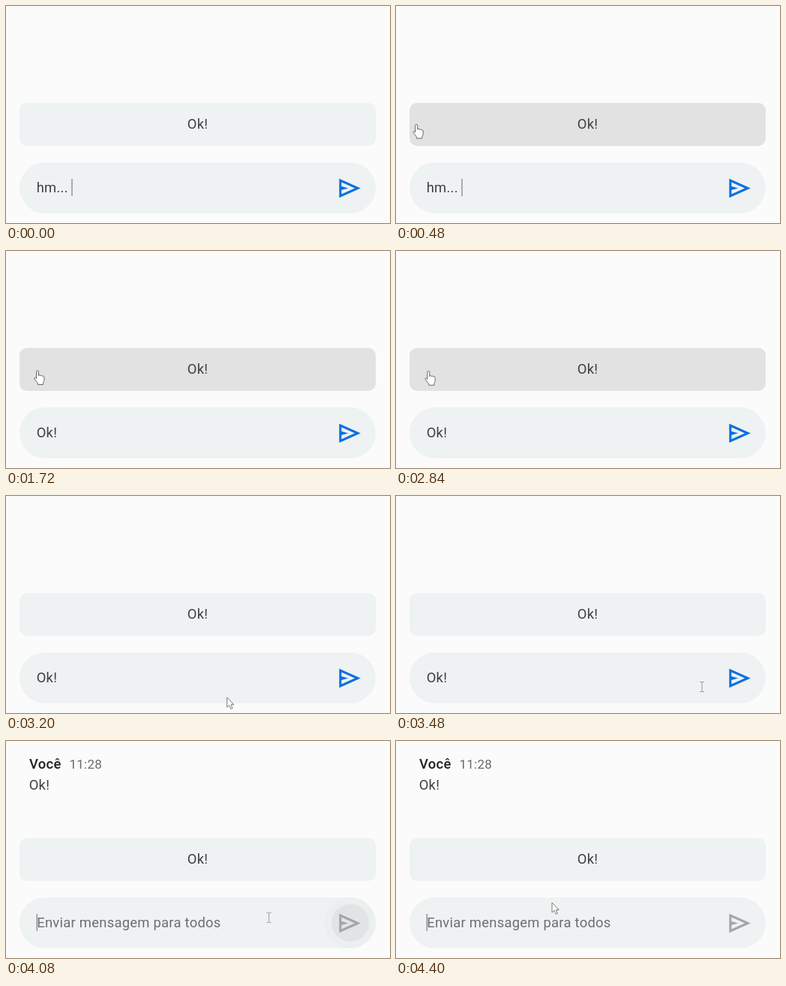
Write an HTML page that moves like this. It is 512 by 290 pixels and loops after 4.44 s.

```html
<!DOCTYPE html>
<html lang="pt">
<head>
<meta charset="utf-8">
<title>Chat</title>
<style>
  html, body { margin: 0; width: 100%; height: 100%; overflow: hidden; background: #fbfbfb; }
  svg { display: block; width: 512px; height: 290px; }
  text {
    font: 18.4px Roboto, sans-serif;
    letter-spacing: .0143em;
    fill: #3c4043;
    white-space: pre;
  }
  #hint { fill: #6b6e72; }
  .name { font-weight: 500; fill: #202124; }
  .time { font-size: 17px; fill: #66696d; }
  #pointer path { fill: #fff; stroke: #666; stroke-width: 1; stroke-linejoin: round; }
  #pointer #arrow { stroke: #777; }
  #pointer #beam { fill: none; stroke: #999; }
</style>
</head>
<body>
<svg viewBox="0 0 512 290">
  <rect width="512" height="290" fill="#fbfbfb"/>

  <g id="message">
    <text class="name" x="31" y="37">Você</text>
    <text class="time" x="84.5" y="37">11:28</text>
    <text x="30.7" y="65">Ok!</text>
  </g>

  <rect id="reply" x="18" y="129.5" width="475" height="57.5" rx="10"/>
  <text x="255.5" y="164" text-anchor="middle">Ok!</text>

  <rect x="18" y="209" width="475" height="68" rx="34" fill="#eef2f3"/>
  <text id="draft" x="40.7" y="249"></text>
  <text id="hint" x="41.2" y="249">Enviar mensagem para todos</text>
  <rect id="caret" y="231" width="1" height="23" fill="#666"/>

  <circle id="ripple" cx="459" cy="243" r="34" fill="#e4e6e7"/>
  <circle id="halo" cx="459" cy="243" r="25" fill="#cccdce"/>
  <path id="send" transform="translate(439.8 224.3) scale(1.5 1.6)"
    d="M3 20V4l19 8-19 8Zm2-3 11.85-5L5 7v3.5l6 1.5-6 1.5V17Z"/>

  <g id="pointer">
    <path id="arrow" d="M0 0V13.2L3 10.4 5.2 15.4 7.4 14.4 5.3 9.6H9.2Z"/>
    <path id="hand" d="M-1.5 11V1.8a1.5 1.5 0 0 1 3 0V7.2c.3-1.3 2.5-1.2 2.7.2.5-1 2.3-.8 2.5.6.7-.7 2.2-.3 2.2 1V13c0 2-1.2 2.7-1.4 4.2V19H.5V17.4C-.8 15.8-2.3 13.6-4 11.4-5 10-3.2 9-2.2 10.2Z"/>
    <path id="beam" d="M-3-6.5H-1L0-5.8 1-6.5H3M0-5.8V5.8M-3 6.5H-1L0 5.8 1 6.5H3"/>
  </g>
</svg>
<script>
const LOOP = 4440, TICK = 40;
const TYPED = 1720, PRESS = 3800, SENT = 3960, POSTED = 4040;

const smooth = k => k * k * (3 - 2 * k);
const settle = k => 1 - (1 - k) ** 1.55;
const clamp = v => Math.min(1, Math.max(0, v));
const ramp = (t, from, to) => clamp((t - from) / (to - from));

// pointer stops, each move a curve pulled towards `via`
const home = { x: -9, y: 154 }, reply = { x: 42, y: 159.5 }, input = { x: 408, y: 255 },
      button = { x: 449, y: 250 }, away = { x: 208, y: 216 };
const mid = (a, b) => ({ x: (a.x + b.x) / 2, y: (a.y + b.y) / 2 });
const move = (start, end, from, to, ease = smooth, via = mid(from, to)) =>
  ({ start, end, from, to, ease, via });
const moves = [
  move(40, 840, home, reply, settle),
  move(2820, 3480, reply, input, smooth, { x: 285, y: 315 }),
  move(3480, 3760, input, button),
  move(3830, 4400, button, away)
];

const el = id => document.getElementById(id);
const show = (id, on) => el(id).style.display = on ? '' : 'none';

function pointerAt(t) {
  const m = moves.findLast(m => t >= m.start);
  if (!m) return { x: -20, y: home.y };
  const u = m.ease(ramp(t, m.start, m.end)), v = 1 - u;
  const curve = axis => v * v * m.from[axis] + 2 * u * v * m.via[axis] + u * u * m.to[axis];
  return { x: curve('x'), y: curve('y') };
}

function draw(t) {
  const { x, y } = pointerAt(t);
  const sent = t >= SENT;
  const overReply = x >= 18 && x <= 493 && y >= 130 && y <= 187;
  const overSend = !sent && Math.hypot(x - 459, y - 243) < 25;
  const overInput = x > 40 && x < 425 && y > 221 && y < 262;
  const shape = overReply || overSend ? 'hand' : overInput ? 'beam' : 'arrow';

  for (const id of ['hand', 'beam', 'arrow']) show(id, id === shape);
  el('pointer').setAttribute('transform', `translate(${x.toFixed(1)} ${y.toFixed(1)})`);

  el('reply').setAttribute('fill', overReply ? '#e2e2e2' : '#eef2f3');
  el('draft').textContent = sent ? '' : t < TYPED ? 'hm... ' : 'Ok!';
  show('hint', sent);
  show('message', t >= POSTED);

  const blinkOn = t < 520 || (t >= 1040 && t < 1600);
  show('caret', blinkOn || sent);
  el('caret').setAttribute('x', sent ? 40.7 : 87.5);

  const fade = 1 - ramp(t, SENT - TICK, SENT + 200);
  const press = ramp(t, PRESS, PRESS + 80);
  el('halo').style.opacity = overSend || press ? fade * (.45 + .55 * press) : 0;
  el('ripple').style.opacity = fade * press;
  el('send').setAttribute('fill', sent ? '#a3a5a7' : '#0b6fe0');
}

const start = performance.now();
function frame() {
  const t = (performance.now() - start) % LOOP;
  draw(Math.floor(t / TICK) * TICK);
  requestAnimationFrame(frame);
}
frame();
</script>
</body>
</html>
```
